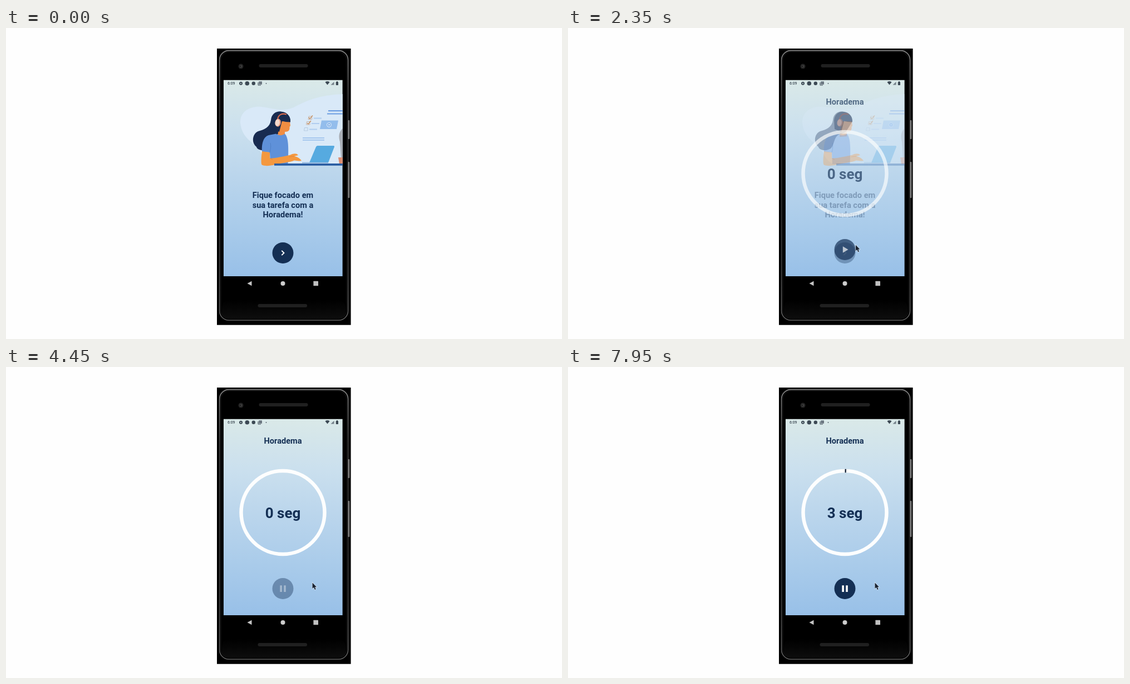
An HTML page with a canvas for the animation above (8000 ms loop, 999 by 560 pixels).

```html
<!DOCTYPE html>
<html lang="pt">
<head>
<meta charset="utf-8">
<title>Horadema</title>
<style>
html, body { margin: 0; width: 100%; height: 100%; overflow: hidden; background: #fefefe; }
/* Softens edges like an upscaled screen recording */
canvas { display: block; width: 999px; height: 560px; filter: blur(0.45px); }
</style>
</head>
<body>
<canvas id="stage" width="999" height="560"></canvas>
<script>
const ctx = document.getElementById('stage').getContext('2d');
const LOOP = 8000;
const CX = 497.5;
const NAVY = '#142f54';
const HAIR = '#182b50';
const SCREEN = [390.8, 93.5, 214, 353.5];
const RING = { y: 262, r: 75, width: 6.5, total: 600 };
const TIMER_START = 4420;

// Cursor stops: time, x, y
const CURSOR = [
  [900, 622, 440], [1400, 493, 398], [2050, 493, 398], [2600, 534, 384.5],
  [3300, 534, 384.5], [3700, 497, 397], [4050, 497, 397], [4400, 550, 388], [4700, 551, 388]
];

const clamp = v => Math.max(0, Math.min(1, v));
const ramp = (t, a, b) => clamp((t - a) / (b - a));
const ease = v => v * v * (3 - 2 * v);

function shape(d, color) {
  ctx.fillStyle = color;
  ctx.fill(new Path2D(d));
}

function line(d, color, width) {
  ctx.strokeStyle = color;
  ctx.lineWidth = width;
  ctx.stroke(new Path2D(d));
}

function disc(x, y, r, color) {
  oval(x, y, r, r, color);
}

function oval(x, y, rx, ry, color, turn = 0) {
  ctx.fillStyle = color;
  ctx.beginPath();
  ctx.ellipse(x, y, rx, ry, turn, 0, Math.PI * 2);
  ctx.fill();
}

function box(x, y, w, h, color, r = 0) {
  ctx.fillStyle = color;
  ctx.beginPath();
  ctx.roundRect(x, y, w, h, r);
  ctx.fill();
}

function frame(x, y, w, h, color, r, width) {
  ctx.strokeStyle = color;
  ctx.lineWidth = width;
  ctx.beginPath();
  ctx.roundRect(x, y, w, h, r);
  ctx.stroke();
}

function text(str, x, y, size, color = NAVY, align = 'center', weight = 700) {
  ctx.font = `${weight} ${size}px Roboto, sans-serif`;
  ctx.textAlign = align;
  ctx.fillStyle = color;
  ctx.fillText(str, x, y);
}

function gradient(x0, y0, x1, y1, ...colors) {
  const g = ctx.createLinearGradient(x0, y0, x1, y1);
  colors.forEach((c, i) => g.addColorStop(i / (colors.length - 1), c));
  return g;
}

function withAlpha(alpha, draw) {
  ctx.save();
  ctx.globalAlpha *= alpha;
  draw();
  ctx.restore();
}

function drawPhone() {
  box(379, 37, 240.6, 497.7, '#000');
  const rim = gradient(0, 40, 0, 526, '#858585', '#454545', '#3a3a3a', '#383838', '#454545', '#606060');
  frame(383.6, 40.6, 231, 485.6, rim, 17, 1.6);
  frame(386, 43, 226, 480, '#111', 15, 1.5);
  box(388, 490, 222, 33, gradient(0, 490, 0, 523, '#000', '#0d0d0d'), 13);
  box(614.3, 166, 3.2, 34, '#757575', 1);
  box(614.3, 241, 3.2, 65, '#757575', 1);

  box(454.5, 65, 88, 6, '#202020', 3);
  box(452.5, 497, 88.5, 6, '#202020', 3);
  disc(422, 69, 4.5, '#242424');
  disc(422, 69, 2.2, '#4b4b4b');
  disc(421.5, 69, 1.2, '#111');

  shape('M433.5 460 L441.5 455.8 V464.2 Z', '#c4c4c4');
  disc(CX, 460, 4, '#cdcdcd');
  box(552.4, 455.8, 8.6, 8.4, '#c0c0c0', 0.5);
}

function drawBackground() {
  ctx.fillStyle = gradient(0, 93, 0, 447, '#dae9e8', '#cbe0ee', '#bad5ec', '#a9cbea', '#98c0e8');
  ctx.fillRect(...SCREEN);
}

function drawStatus() {
  const ink = '#3c4954';
  text('6:09', 398, 102.3, 6.8, ink, 'left', 500);
  disc(422, 99.8, 3, ink);
  disc(422, 99.8, 1, '#d6e5e8');
  disc(433.3, 99.8, 3.8, ink);
  disc(444.8, 99.8, 3.2, ink);
  line('M453 98 V103 H458', ink, 1);
  box(454.2, 96.3, 5.8, 5.4, '#6b7781', 0.5);
  disc(467.5, 99.8, 0.9, ink);
  shape('M573.5 97.4 Q577.5 94.8 581.5 97.4 L577.5 102.6 Z', ink);
  shape('M583.5 102.6 L589.5 96.8 V102.6 Z', '#74818a');
  box(592.8, 97, 4.2, 6, ink, 0.7);
  box(594, 96, 1.8, 1.5, ink);
}

function drawBoard() {
  line('M579 149.2 H606 M577 154.5 H606', '#6c9ee2', 2.2);
  line('M553 162.5 H567 M549 172 H563 M545 182.5 H559', '#b0cdf0', 2);
  line('M533 198 H572 M533 201.7 H572', '#94bceb', 1.5);
  line('M544 159 H549.5 V164.5 H543 Z M540.5 168.5 H546 V174 H539.5 Z', '#c9b3a4', 0.9);
  line('M544 161 L546 163.5 L551 157.5 M541 171 L543 173 L548 167', '#c98f5c', 1.3);
  line('M536.5 179.5 H542 V185 H535.5 Z', '#adc3da', 0.8);
  shape('M567 166.5 H597 L594 182 H564 Z', '#93bdec');
  disc(580.5, 174.3, 4.4, '#d9e8f8');
  disc(580.5, 174.3, 3.2, '#84b2e8');
  shape('M579.5 172.6 L582.8 174.3 L579.5 176 Z', '#e4effa');
}

function drawWorker() {
  // Long hair falling behind the back
  shape('M476 166 C477 154 486 149.5 494 150.5 C504 151 511 158 511 168 L500 186 C494 191 489 191 486 192 ' +
    'C477 198 479 210 472 217 C465 222 452 221 450 214 C441 207 442 191 453 186 C464 183 474 179 476 166 Z', HAIR);
  // Face and neck
  shape('M493 168 H510 L511 176 L509.5 178 C510 184 508 187 501 187 L501 195 L488 196 L490 180 Z', '#f18d42');
  shape('M478 166 C480 152 490 149 498 151.5 C507 154 511.5 160 511 169.5 C505 169.5 500 168.5 496 167.5 ' +
    'L491 187 L479 182 Z', HAIR);
  line('M488 165 C489 156 496 153 504 155.5', '#dc6a4a', 2);
  oval(488.7, 170.5, 5.2, 7.2, '#ea9c80', 0.15);
  oval(487.6, 170.5, 4, 6.1, '#f5d9cd', 0.15);
  // Shirt
  shape('M485 190.5 C492 195 498 193 501 190.5 C508 197 508 218 506.5 245 H475 L474 224 L460 223 ' +
    'C459 209 462 196 472 193 Z', '#5f91d9');
  line('M474 224 C476 216 476 211 475 207', '#4c7bc1', 0.8);
  // Arms
  shape('M460 222 L474 224 L474 235 C486 234 500 231 511 228.5 C516 226 522 225 525 229 ' +
    'C523 230 520 230 518 231 C525 232 529 236 531 239 C527 240 522 239 518 238.5 ' +
    'C510 242 495 243 483 246 C473 249 460 249 459 245 C458 239 459 230 460 222 Z', '#f4983f');
  line('M474 234 L479 237 M509 232 L518 231', '#dc7b34', 0.7);
}

function drawIllustration() {
  shape('M421 171 C420 150 439 140 459 142 C481 145 499 151 517 143 C542 130 562 121 606 119 ' +
    'V246 H484 C465 244 462 231 455 219 C445 206 424 199 421 171 Z', '#d9e9f8');
  drawBoard();
  shape('M606 180 C598 186 597 196 600 205 L602 234 H606 Z', '#a8adb4');
  shape('M597 233 H606 V245 H599 Z', '#dc8d71');
  drawWorker();
  shape('M560 212 H588.5 Q590.5 212 590 214 L579 242.5 H545 L557 214 Q558 212 560 212 Z', '#56aae0');
  line('M532 242.5 H579', '#83aedb', 1.3);
  box(482, 244, 124, 3.8, '#2a5da2');
}

function drawIntro(t) {
  drawIllustration();
  ['Fique focado em', 'sua tarefa com a', 'Horadema!'].forEach((s, i) =>
    text(s, CX, 306.4 + i * 17.3, 14.6));
  const press = ramp(t, 2000, 2100) * (1 - ramp(t, 2150, 2300));
  withAlpha(1 - 0.7 * press, () => {
    disc(CX, 405, 19, NAVY);
    line('M495.3 400.8 L499.5 405 L495.3 409.2', '#fff', 1.9);
  });
}

function drawTimer(t) {
  const sec = Math.max(0, Math.floor((t - TIMER_START) / 1000));
  text('Horadema', CX, 138.2, 14.6);

  ctx.lineWidth = RING.width;
  ctx.strokeStyle = '#fdfefe';
  ctx.beginPath();
  ctx.arc(CX, RING.y, RING.r, 0, Math.PI * 2);
  ctx.stroke();
  if (sec > 0) {
    const top = -Math.PI / 2;
    ctx.strokeStyle = '#17263a';
    ctx.beginPath();
    ctx.arc(CX, RING.y, RING.r, top, top + Math.PI * 2 * sec / RING.total);
    ctx.stroke();
  }
  text(`${sec} seg`, CX, 272, 26);

  const press = ramp(t, 4200, 4300) * (1 - ease(ramp(t, 4400, 4620)));
  withAlpha(1 - 0.7 * press, () => {
    disc(CX, 399, 19, NAVY);
    if (t < 4400) {
      shape('M493.8 393.3 L503.5 399 L493.8 404.7 Z', '#fff');
    } else {
      box(492.3, 393.3, 3.6, 11.6, '#fff');
      box(499.2, 393.3, 3.6, 11.6, '#fff');
    }
  });
}

function drawCursor(t) {
  if (t < CURSOR[0][0]) return;
  let i = 0;
  while (i < CURSOR.length - 2 && t >= CURSOR[i + 1][0]) i++;
  const [ta, xa, ya] = CURSOR[i];
  const [tb, xb, yb] = CURSOR[i + 1];
  const k = ease(ramp(t, ta, tb));
  ctx.save();
  ctx.translate(xa + (xb - xa) * k, ya + (yb - ya) * k);
  const arrow = 'M0.5 0.5 V11 L3 8.8 L4.8 13 L6.6 12.2 L4.9 8.2 H8 Z';
  line(arrow, 'rgba(235,241,248,0.75)', 1.4);
  shape(arrow, '#182231');
  ctx.restore();
}

function draw(t) {
  ctx.fillStyle = '#fefefe';
  ctx.fillRect(0, 0, 999, 560);
  drawPhone();
  ctx.save();
  ctx.beginPath();
  ctx.rect(...SCREEN);
  ctx.clip();
  drawBackground();
  const swap = ramp(t, 2250, 2400);
  if (swap < 1) withAlpha(1 - swap, () => drawIntro(t));
  if (swap > 0) withAlpha(swap, () => drawTimer(t));
  drawStatus();
  ctx.restore();
  // The pointer is only seen within the recorded area
  ctx.save();
  ctx.beginPath();
  ctx.rect(379, 37, 241, 498);
  ctx.clip();
  drawCursor(t);
  ctx.restore();
}

const start = performance.now();
function tick() {
  draw((performance.now() - start) % LOOP);
  requestAnimationFrame(tick);
}
tick();
</script>
</body>
</html>
```
